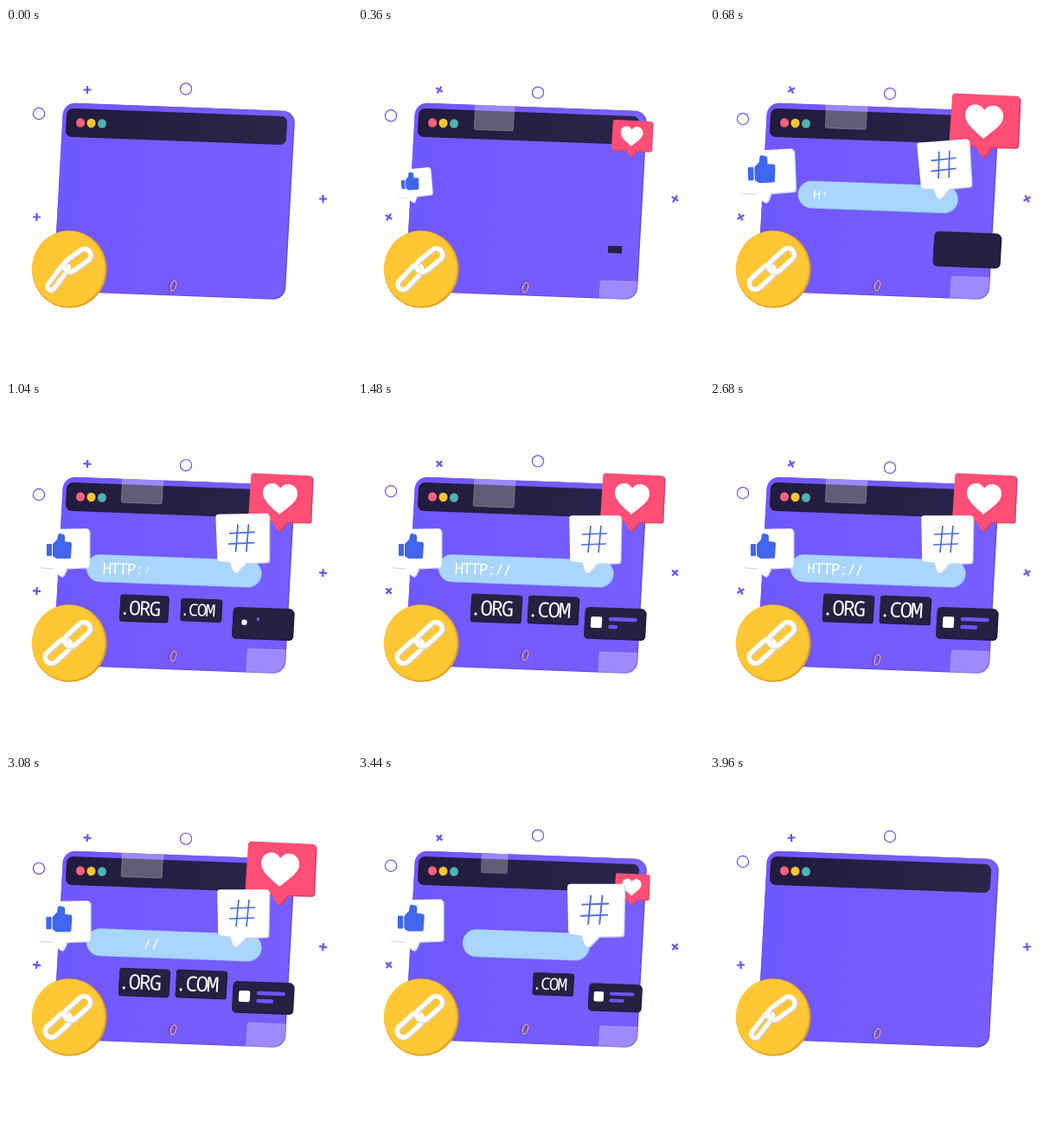
An HTML page with a canvas that plays this animation: 400 by 400 pixels, repeating every 4 s.

```html
<!DOCTYPE html>
<html lang="en">
<head>
<meta charset="utf-8">
<title>Web address illustration</title>
<style>
html, body { margin: 0; width: 100%; height: 100%; overflow: hidden; background: #fff; }
canvas { display: block; width: 400px; height: 400px; }
</style>
</head>
<body>
<canvas width="400" height="400"></canvas>
<script>
const ctx = document.querySelector('canvas').getContext('2d');
const LOOP = 4;
const VIOLET = '#7259ff', DARK = '#262043', BLUE = '#4067ee';

// Easing
const clamp = p => Math.max(0, Math.min(1, p));
const span = (t, start, length) => clamp((t - start) / length);
const inBack = p => 2.7 * p ** 3 - 1.7 * p ** 2;
const inCubic = p => p ** 3;
const appear = (t, inAt, inFor, outAt, outFor, ease) => Math.max(0, t < outAt
  ? 1 - ease(1 - span(t, inAt, inFor))
  : 1 - ease(span(t, outAt, outFor)));
const pop = (...times) => appear(...times, inBack);
const grow = (...times) => appear(...times, inCubic);
const wave = (t, degrees) => Math.sin(Math.PI * t + degrees * Math.PI / 180);

// Drawing
function at(x, y, scale, draw, angle = 0) {
  if (scale < 0.005) return;
  ctx.save();
  ctx.translate(x, y);
  ctx.rotate(angle * Math.PI / 180);
  ctx.scale(scale, scale);
  draw();
  ctx.restore();
}

// Draws on the tilted plane of the window
function onPlane(x, y, scale, draw) {
  at(x, y, scale, () => {
    ctx.transform(1, 0.037, -0.055, 1, 0, 0);
    draw();
  });
}

function box(w, h, r, fill, x = 0, y = 0) {
  ctx.beginPath();
  ctx.roundRect(x - w / 2, y - h / 2, w, h, r);
  ctx.fillStyle = fill;
  ctx.fill();
}

function oval(x, y, rx, ry, fill) {
  ctx.beginPath();
  ctx.ellipse(x, y, rx, ry, 0, 0, 7);
  ctx.fillStyle = fill;
  ctx.fill();
}

function line(x1, y1, x2, y2, width, color) {
  ctx.beginPath();
  ctx.moveTo(x1, y1);
  ctx.lineTo(x2, y2);
  ctx.lineWidth = width;
  ctx.strokeStyle = color;
  ctx.stroke();
}

function softShape(points, round, color) {
  ctx.beginPath();
  points.forEach(([x, y]) => ctx.lineTo(x, y));
  ctx.closePath();
  ctx.lineWidth = round;
  ctx.lineJoin = 'round';
  ctx.fillStyle = ctx.strokeStyle = color;
  ctx.fill();
  ctx.stroke();
}

function bubble(points, face, edge) {
  at(1, 1, 1, () => softShape(points, 7, edge));
  at(-0.3, -0.3, 1, () => softShape(points, 7, face));
}

function word(text, size, x, pitch, letterScale = () => 1) {
  ctx.font = `200 ${size}px "Noto Sans Mono", monospace`;
  ctx.textAlign = 'center';
  ctx.fillStyle = '#fff';
  [...text].forEach((letter, i) =>
    at(x + i * pitch, 0, letterScale(i), () => ctx.fillText(letter, 0, size * 0.357)));
}

// Parts
function ornaments(t) {
  for (const [x, y] of [[38, 103 + 4 * wave(t, -90)], [208, 72 + 4 * wave(t, -23)]]) {
    ctx.beginPath();
    ctx.arc(x, y, 6.6, 0, 7);
    ctx.lineWidth = 1.2;
    ctx.strokeStyle = '#6c52f5';
    ctx.stroke();
  }
  for (const [x, y] of [[94, 71.5], [35.5, 218.5], [366.5, 197.5]])
    at(x, y, 1, () => {
      line(-4.5, 0, 4.5, 0, 2.2, '#6c52f5');
      line(0, -4.5, 0, 4.5, 2.2, '#6c52f5');
    }, 90 * t);
}

function browser() {
  onPlane(194.5, 200.3, 1, () => box(268, 218, 14, '#5d46e2'));
  onPlane(193.8, 199.9, 1, () => {
    const shade = ctx.createLinearGradient(-134, 0, 134, 0);
    shade.addColorStop(0, '#7058ff');
    shade.addColorStop(1, '#765eff');
    box(267, 217, 14, shade);
  });
  onPlane(197, 114, 1, () => {
    const shade = ctx.createLinearGradient(-127, 0, 127, 0);
    shade.addColorStop(0, '#211b3d');
    shade.addColorStop(1, '#2c254a');
    box(255, 33, 7, shade);
  });
  oval(86, 109.5, 5, 5.3, '#f6607d');
  oval(98.5, 110, 5, 5.3, '#ffc531');
  oval(111, 110.5, 5, 5.3, '#4db3ae');
}

function glassPanes(t) {
  ctx.save();
  onPlane(194, 200, 1, () => {
    ctx.beginPath();
    ctx.roundRect(-134, -109, 268, 218, 14);
  });
  ctx.clip();
  const pane = () => {
    box(47, 48, 2, 'rgba(255,255,255,.28)');
    ctx.lineWidth = 0.8;
    ctx.strokeStyle = 'rgba(255,255,255,.3)';
    ctx.stroke();
  };
  onPlane(158, 95.7 + 3.5 * wave(t, 122), grow(t, 0.1, 0.4, 3.05, 0.55), pane);
  onPlane(301.5, 314 + 4 * wave(t, 90), grow(t, 0.1, 0.4, 3.3, 0.5), pane);
  ctx.restore();
}

function addressBar(t) {
  const s = grow(t, 0.38, 0.54, 3.05, 0.6);
  const letter = i => grow(t, 0.55 + 0.08 * i, 0.3, 2.55 + 0.08 * i, 0.25);
  if (s > 0) onPlane(194, 195, 1, () => {
    const h = 31 * Math.min(1, 1.4 * s);
    box(202 * s, h, h / 2, '#8fc0f5', 0.6, 0.8);
    box(202 * s, h, h / 2, '#a9d5ff');
    word('HTTP://', 18, -77 * s, 9.3 * s, letter);
  });
}

function tag(x, y, text, scale) {
  onPlane(x, y, scale, () => {
    box(59, 32, 3, '#17122f', 0.5, 0.8);
    box(58, 32, 3, DARK);
    word(text, 24, -23, 12.2);
  });
}

function card(t) {
  onPlane(297, 256, pop(t, 0.33, 0.6, 3.08, 0.5), () => {
    box(71, 36, 5, '#17122f', 0.5, 0.9);
    box(70, 36, 5, DARK);
    const s = span(t, 0.9, 0.3);
    box(13 * s, 13 * s, 2, '#fff', -21.5, -0.5);
    const bar = (y, w) => w && box(w, 4.6, 2.3, '#6c55f2', -7.5 + w / 2, y);
    bar(-4.8, 33 * span(t, 1, 0.4));
    bar(4.2, 20 * span(t, 1.25, 0.42));
  });
}

function heartBubble(t) {
  at(316, 149, pop(t, 0.22, 0.8, 2.73, 0.83), () => {
    bubble([[-29, -63], [35, -60], [33, -13], [7, -13.5], [0, -4], [-6, -14.5], [-32, -16]],
      '#ff4f76', '#dd3962');
    ctx.beginPath();
    ctx.moveTo(0, -19);
    ctx.bezierCurveTo(-8, -27, -19, -34, -19, -44);
    ctx.bezierCurveTo(-19, -56, -4, -59, 1, -49);
    ctx.bezierCurveTo(7, -58, 21, -54, 21, -43);
    ctx.bezierCurveTo(21, -33, 9, -27, 0, -19);
    ctx.fillStyle = '#fff';
    ctx.fill();
  });
}

function thumbBubble(t) {
  at(64, 202, pop(t, 0.2, 0.8, 2.92, 0.95), () => {
    bubble([[-27, -51], [29, -52], [29, -14], [4, -13], [0, -4], [-8, -13], [-23, -14]],
      '#fff', '#d3d8ee');
    const nod = -10 * Math.sin(Math.PI * span(t, 1.8, 0.9));
    at(-2, -35, 1, () => {
      softShape([[-14, -2], [-10, -2], [-10, 10], [-14, 10]], 2, BLUE);
      softShape([[-6, -2], [-1, -7], [0, -13], [4, -12], [4, -4], [12, -3], [11, 12], [-3, 12], [-6, 10]],
        4, BLUE);
    }, nod);
  }, -6 * (1 - span(t, 0.2, 0.8)));
}

function hashBubble(t) {
  at(266, 198, pop(t, 0.4, 0.75, 3.08, 0.8), () => {
    bubble([[-18, -63], [35, -63], [34, -15], [10, -14.5], [0, -4], [-4, -15.5], [-17, -17]],
      '#fff', '#ccd1e8');
    const stroke = (...ends) => line(...ends, 1.7, '#4a6be0');
    stroke(3, -55, 0, -24);
    stroke(15, -55, 12, -24);
    stroke(-7, -45, 22, -46);
    stroke(-8, -33, 21, -34);
  }, -7 * (1 - span(t, 0.4, 0.75)));
}

function link(x, y, length, width, angle) {
  const loop = (dx, dy, thickness, color) => at(x + dx, y + dy, 1, () => {
    ctx.beginPath();
    ctx.roundRect(-length / 2, -width / 2, length, width, width / 2);
    ctx.lineWidth = thickness;
    ctx.strokeStyle = color;
    ctx.stroke();
  }, angle);
  loop(0.5, 0.7, 6, '#cfcbd2');
  loop(0, 0, 5.2, '#fff');
}

function coin(t) {
  oval(73.3, 279, 43.3, 44.8, '#e3a021');
  oval(72.3, 278.2, 42.2, 43.8, '#ffc734');
  const open = span(t, 0, 0.6) * (1 - span(t, 3.5, 0.5));
  link(60, 288, 35, 8.5 + 6 * open, -53 + 11 * open);
  link(82.5, 268.5, 35, 14.5, -36 - 6 * open);
}

function smallRing(t) {
  at(193, 296 + 3.8 * wave(t, 30), 1, () => {
    const ring = (dx, color) => {
      ctx.beginPath();
      ctx.ellipse(dx, 0, 3, 5.8, 0, 0, 7);
      ctx.lineWidth = 1.3;
      ctx.strokeStyle = color;
      ctx.stroke();
    };
    ring(-0.9, '#5038b8');
    ring(0.3, '#f3b06c');
  }, 17);
}

function render(t) {
  ctx.clearRect(0, 0, 400, 400);
  ornaments(t);
  browser();
  glassPanes(t);
  smallRing(t);
  addressBar(t);
  tag(159.5, 238.5, '.ORG', grow(t, 0.75, 0.45, 3, 0.44));
  tag(225.5, 240.5, '.COM', grow(t, 0.85, 0.45, 3.15, 0.5));
  card(t);
  heartBubble(t);
  hashBubble(t);
  thumbBubble(t);
  coin(t);
}

function tick() {
  render(performance.now() / 1000 % LOOP);
  requestAnimationFrame(tick);
}
tick();
</script>
</body>
</html>
```
